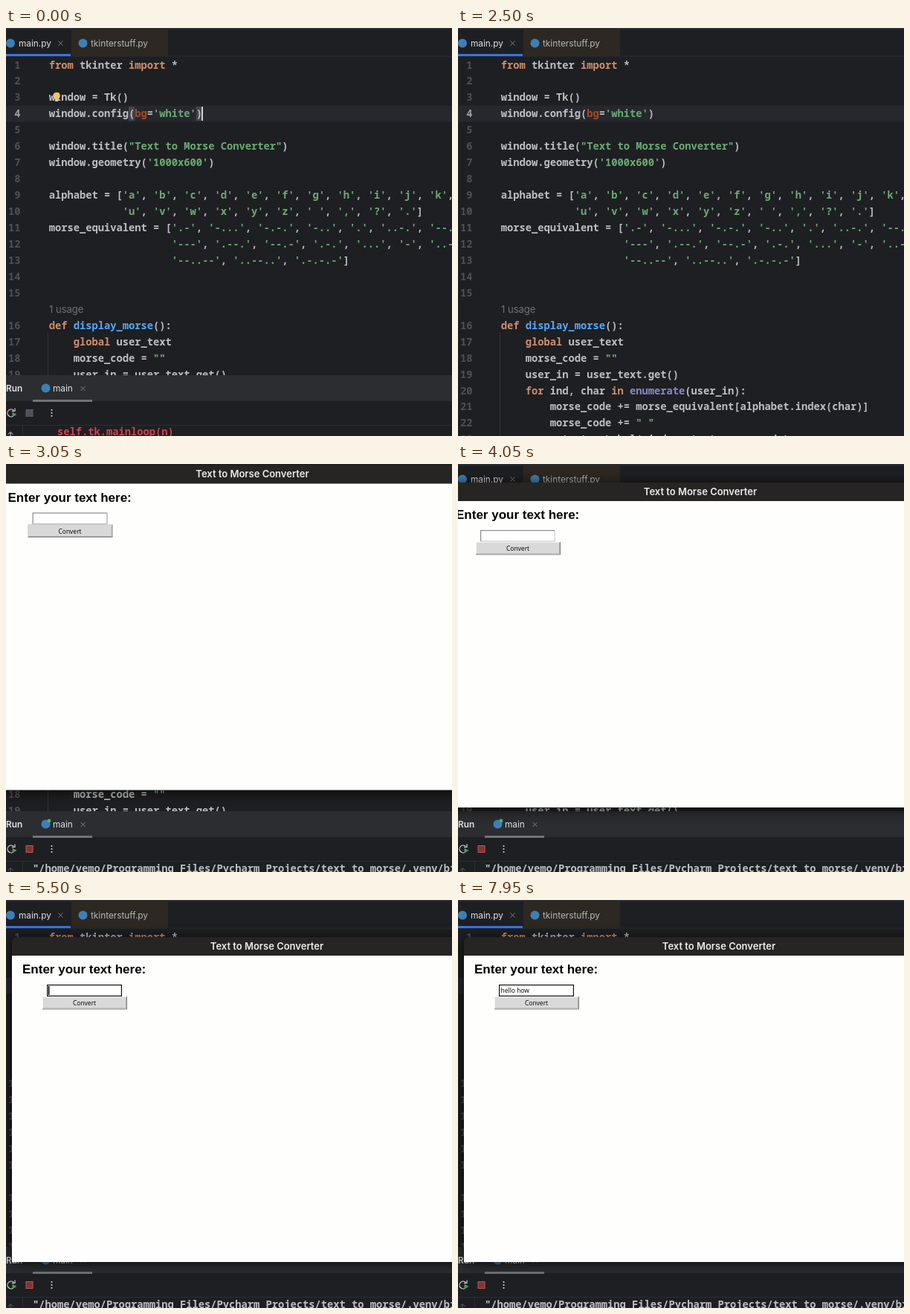
Recreate the animation shown at these times as an HTML page with a canvas. Size 600 by 550 pixels, loop 8000 ms.

```html
<!DOCTYPE html>
<html lang="en">
<head>
<meta charset="utf-8">
<title>Text to Morse Converter</title>
<style>
  html, body { margin: 0; width: 100%; height: 100%; overflow: hidden; background: #1e1f22; }
  canvas { display: block; }
</style>
</head>
<body>
<canvas id="stage" width="600" height="550"></canvas>
<script>
const stage = document.getElementById('stage').getContext('2d');
const layer = stage.canvas.cloneNode().getContext('2d');   // the window fades as one piece
let ctx = stage;

const LOOP = 8000, STEP = 50;
const MONO = '600 13.75px "Noto Sans Mono", monospace';
const HINT = '13px Inter, sans-serif';
const UI = '11.8px Inter, sans-serif';
const UI_BOLD = '600 11.8px Inter, sans-serif';
const TITLE = '600 13px Inter, sans-serif';
const FORM = '500 8.5px "Open Sans", sans-serif';
const COL = 8.25, ROW = 21.95, CODE_X = 57.7;

const CODE = `from tkinter import *

window = Tk()
window.config(bg='white')

window.title("Text to Morse Converter")
window.geometry('1000x600')

alphabet = ['a', 'b', 'c', 'd', 'e', 'f', 'g', 'h', 'i', 'j', 'k', 'l',
            'u', 'v', 'w', 'x', 'y', 'z', ' ', ',', '?', '.']
morse_equivalent = ['.-', '-...', '-.-.', '-..', '.', '..-.', '--.', '....',
                    '---', '.--.', '--.-', '.-.', '...', '-', '..-', '...-',
                    '--..--', '..--..', '.-.-.-']


def display_morse():
    global user_text
    morse_code = ""
    user_in = user_text.get()
    for ind, char in enumerate(user_in):
        morse_code += morse_equivalent[alphabet.index(char)]
        morse_code += " "
    morse_text = Label(window, text=morse_code)`.split('\n');

const TOKENS = /'[^']*'|"[^"]*"|\w+|[^\w'"]+/g;
const KEYWORDS = ['from', 'import', 'def', 'global', 'for', 'in'];
const SPECIAL = { display_morse: '#56a8f5', enumerate: '#8888c6', bg: '#aa4926' };

function tokenColor(token) {
  if (/^['"]/.test(token)) return '#6aab73';
  if (KEYWORDS.includes(token)) return '#cf8e6d';
  return SPECIAL[token] || '#bcbec4';
}

function rect(x, y, w, h, color) {
  ctx.fillStyle = color;
  ctx.fillRect(x, y, w, h);
}

function dot(x, y, r, color) {
  ctx.fillStyle = color;
  ctx.beginPath();
  ctx.arc(x, y, r, 0, 7);
  ctx.fill();
}

function text(str, x, y, font, color, align = 'left') {
  ctx.font = font;
  ctx.fillStyle = color;
  ctx.textAlign = align;
  ctx.fillText(str, x, y);
}

function stroke(path, color, width = 1) {
  ctx.strokeStyle = color;
  ctx.lineWidth = width;
  ctx.stroke(new Path2D(path));
}

const cross = (x, y) =>
  stroke(`M${x - 3} ${y - 3}l6 6m0 -6l-6 6`, '#7d8088');

function drawTabs() {
  rect(0, 0, 600, 2, '#2b2d30');
  rect(88, 2, 130, 36, '#2d2821');
  rect(0, 37.5, 600, 1, '#2b2d30');
  rect(0, 35, 87, 3, '#3574f0');
  dot(6, 20.5, 6, '#3d7fb5');
  dot(103.5, 20.5, 6, '#3d7fb5');
  text('main.py', 17, 24.7, UI, '#dfe1e5');
  text('tkinterstuff.py', 114, 24.7, UI, '#b4b8bf');
  cross(73.5, 20.5);
}

function drawEditor(focused) {
  rect(0, 104.5, 600, 22, '#26282e');
  rect(56, 411, 1, 139, '#313438');
  if (focused) {
    for (const col of [13, 24]) rect(CODE_X + col * COL, 106, COL, 19, '#43454a');
  }
  CODE.forEach((line, i) => {
    const slot = i < 15 ? i : i + 1;   // the usage hint takes a row of its own
    const y = 54.5 + slot * ROW;
    text(i + 1, 19.5, y, MONO, i === 3 ? '#a1a3ab' : '#4b5059', 'right');
    let col = 0;
    for (const token of line.match(TOKENS) || []) {
      text(token, CODE_X + col * COL, y, MONO, tokenColor(token));
      col += token.length;
    }
  });
  text('1 usage', 58, 383.5, HINT, '#6f737a');
  if (focused) {
    rect(263, 106, 2, 19, '#ced0d6');
    dot(68, 91.5, 4.8, '#f2c55c');
    rect(66, 96, 4, 3, '#c9ccd2');
  }
}

function drawRunPanel(running) {
  rect(0, 468, 600, 82, '#1e1f22');
  rect(0, 468, 600, 35, '#2b2d30');
  rect(36, 501, 80, 3, '#6f737a');
  text('Run', 0, 489.7, UI_BOLD, '#dfe1e5');
  text('main', 63, 489.7, UI, '#dfe1e5');
  dot(53.5, 485.5, 6, '#3d7fb5');
  if (running) dot(58, 481, 2.4, '#5fad65');
  cross(103.5, 486);

  stroke('M10.5 515.5A5 5 0 1 0 10 523M12 512.5v4h-4', '#ced0d6', 1.2);
  ctx.fillStyle = '#57965c';
  ctx.fill(new Path2D('M8.5 517.5l6 3.5l-6 3.5z'));
  rect(26.5, 514, 10, 10, running ? '#c75450' : '#5a5d63');
  rect(27.5, 515, 8, 8, running ? '#7a3836' : '#4e5157');
  for (const y of [515, 519, 523]) dot(61.5, y, 1.1, '#ced0d6');

  rect(0, 535, 600, 1, '#2b2d30');
  rect(22, 535, 1, 15, '#2b2d30');
  stroke('M6 551v-6m-3.5 3l3.5 -3.5l3.5 3.5', running ? '#5a5d63' : '#ced0d6');
  if (running) {
    text('"/home/vemo/Programming Files/Pycharm Projects/text to morse/.venv/bin/python"',
      36, 550, MONO, '#bcbec4');
  } else {
    text('self.tk.mainloop(n)', 69, 548.5, MONO, '#d0424f');
  }
}

// Window placement: start, turn of the drag, resting place.
const PATH = [[3850, -11.5, 1.5], [4050, -17, 25], [4650, 8, 50]];

function windowPosition(t) {
  if (t <= PATH[0][0]) return PATH[0].slice(1);
  for (let i = 1; i < PATH.length; i++) {
    const [t0, x0, y0] = PATH[i - 1], [t1, x1, y1] = PATH[i];
    if (t > t1) continue;
    const p = (t - t0) / (t1 - t0);
    const ease = i === 1 ? p : p * (2 - p);
    return [x0 + (x1 - x0) * ease, y0 + (y1 - y0) * ease];
  }
  return PATH[PATH.length - 1].slice(1);
}

const KEY_TIMES = [6150, 6300, 6550, 6750, 6900, 7150, 7350, 7500, 7950];
const OPEN = 2656, OPEN_MS = 150, FOCUS = 5500;
const WIN_W = 686, WIN_H = 438, BAR_H = 25;

function drawEntry(t) {
  const focused = t >= FOCUS;
  rect(47, 64, 101, 16, focused ? '#111' : '#8c8c8c');
  rect(48.2, 65.2, 98.6, 13.6, '#fff');
  if (!focused) {
    rect(147, 64, 1, 16, '#d9d9d9');
    rect(47, 79, 101, 1, '#d9d9d9');
    return;
  }
  const typed = 'hello how'.slice(0, KEY_TIMES.filter(k => t >= k).length);
  text(typed, 49.5, 75, FORM, '#000');
  const caretOn = (t - FOCUS) % 900 < 600;
  if (caretOn) rect(48.8 + ctx.measureText(typed).width, 66, 1.6, 12, '#000');
}

function drawButton() {
  rect(41, 80, 114, 17.5, '#828282');
  rect(41, 80, 113, 16.5, '#f4f4f4');
  rect(42, 81, 112, 15.5, '#b0b0b0');
  rect(42, 81, 111, 14.5, '#d9d9d9');
  text('Convert', 97.5, 92, FORM, '#000', 'center');
}

function drawWindow(t, scale) {
  const [x, y] = windowPosition(t);
  ctx.clearRect(0, 0, 600, 550);
  ctx.save();
  // Grows from the middle of its bottom edge.
  ctx.translate(x + WIN_W / 2, y + WIN_H);
  ctx.scale(scale, scale);
  ctx.translate(-WIN_W / 2, -WIN_H);

  const frame = new Path2D();
  frame.roundRect(0, 0, WIN_W, WIN_H, [7, 7, 0, 0]);
  ctx.save();
  ctx.shadowColor = 'rgba(0,0,0,.75)';
  ctx.shadowBlur = 18;
  ctx.shadowOffsetY = 2;
  ctx.fillStyle = '#262524';
  ctx.fill(frame);
  ctx.restore();

  rect(0, BAR_H, WIN_W, WIN_H - BAR_H, '#fefefd');
  text('Text to Morse Converter', WIN_W / 2, 16.7, TITLE, '#ececec', 'center');
  rect(623, 14, 6, 1.5, '#ececec');
  stroke('M647 10h6v6h-6z', '#ececec', 1.3);
  text('Enter your text here:', 14, 49, 'bold 17px "Liberation Sans", sans-serif', '#000');
  drawEntry(t);
  drawButton();
  ctx.restore();
}

function draw() {
  const t = Math.floor(performance.now() % LOOP / STEP) * STEP;
  const running = t >= 2650;
  rect(0, 0, 600, 550, '#1e1f22');
  drawEditor(t < 2400);
  drawTabs();
  if (running || t < 750) drawRunPanel(running);

  const progress = (t - OPEN) / OPEN_MS;
  if (progress > 0) {
    const grow = progress < 1 ? 1 - 2 ** (-10 * progress) : 1;
    ctx = layer;
    drawWindow(t, grow);
    ctx = stage;
    ctx.globalAlpha = grow;
    ctx.drawImage(layer.canvas, 0, 0);
    ctx.globalAlpha = 1;
  }
  requestAnimationFrame(draw);
}
draw();
</script>
</body>
</html>
```
